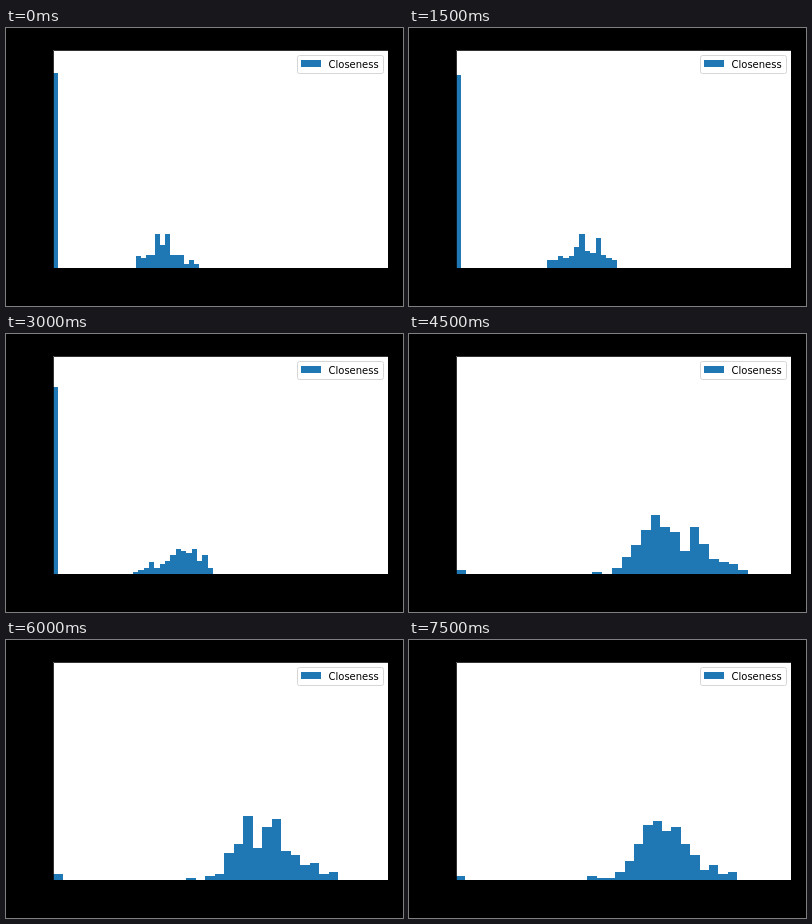
An HTML page for the animation above (8 s loop, 397 by 278 pixels).

```html
<!DOCTYPE html>
<html lang="en">
<head>
<meta charset="utf-8">
<title>Closeness histogram</title>
<style>
  html, body { margin: 0; width: 100%; height: 100%; overflow: hidden; background: #000; }
  svg { display: block; }
  text { font: 10px "DejaVu Sans", sans-serif; }
  .bar { fill: #1f77b4; shape-rendering: crispEdges; }
</style>
</head>
<body>
<svg width="397" height="278" viewBox="0 0 397 278">
  <rect x="47" y="22" width="335" height="218" fill="#fff"/>
  <g id="plot"></g>
  <path d="M47.5 240V22.5H382" fill="none" stroke="#000" stroke-opacity=".8"/>
  <rect x="291.5" y="27.5" width="86" height="18" rx="2" fill="#fff" stroke="#d6d6d6"/>
  <rect class="bar" x="295" y="32" width="20" height="7"/>
  <text x="322.5" y="40">Closeness</text>
</svg>
<script>
const LOOP = 8000, BINS = 30;
const LEFT = 47.1, BASE = 239.8, FLOOR = 240, UNIT = 217.44 / 115;

// at: start in ms; right: right edge of the last bin;
// first: count in bin 0; tail: counts of the last bins
const steps = [
  { at: 0, right: 193, first: 103, tail: [6, 5, 7, 7, 18, 12, 18, 7, 7, 7, 2, 4, 2] },
  { at: 1500, right: 208, first: 102, tail: [4, 4, 6, 5, 6, 11, 18, 9, 8, 16, 7, 5, 4] },
  { at: 3000, right: 207, first: 99, tail: [1, 2, 3, 6, 3, 5, 7, 10, 13, 12, 11, 13, 7, 10, 3] },
  { at: 4500, right: 339, first: 2, tail: [1, 0, 3, 9, 15, 23, 31, 25, 22, 12, 25, 16, 8, 6, 5, 2] },
  { at: 6000, right: 332, first: 3, tail: [1, 0, 2, 3, 14, 19, 34, 17, 28, 32, 15, 13, 8, 9, 3, 4] },
  { at: 7500, right: 328, first: 2, tail: [2, 1, 1, 4, 10, 19, 29, 31, 26, 28, 19, 13, 5, 8, 3, 4] }
];

function histogramPath({ right, first, tail }) {
  const edge = bin => Math.round(LEFT + (right - LEFT) * bin / BINS);
  const bar = (bin, count) => count
    ? `M${edge(bin)} ${FLOOR}V${Math.round(BASE - count * UNIT)}H${edge(bin + 1)}V${FLOOR}z`
    : '';
  const start = BINS - tail.length;
  return bar(0, first) + tail.map((count, i) => bar(start + i, count)).join('');
}

const plot = document.getElementById('plot');
steps.forEach((step, i) => {
  const path = document.createElementNS(plot.namespaceURI, 'path');
  path.setAttribute('class', 'bar');
  path.setAttribute('d', histogramPath(step));
  plot.append(path);

  const frames = steps.map(({ at }, j) => ({
    offset: at / LOOP, opacity: Number(i === j), easing: 'step-end'
  }));
  frames.push({ offset: 1, opacity: Number(i === steps.length - 1) });
  path.animate(frames, { duration: LOOP, iterations: Infinity });
});
</script>
</body>
</html>
```
